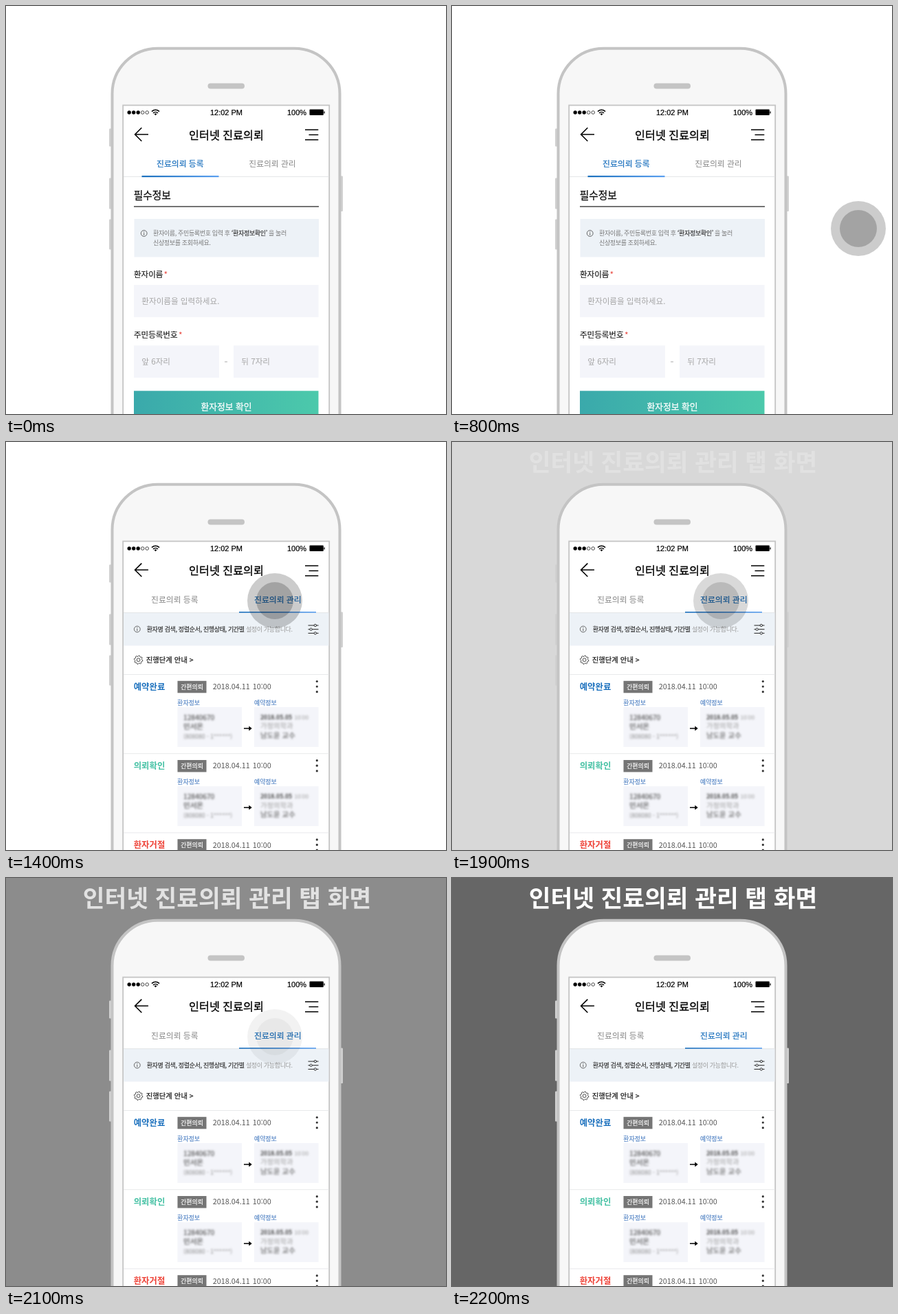
Animation, 640 px wide and 594 px high, one loop 3700 ms. Source, as an HTML page:

```html
<!DOCTYPE html>
<html lang="ko">
<head>
<meta charset="utf-8">
<style>
html, body { margin: 0; width: 100%; height: 100%; overflow: hidden; background: #fff; }
svg { display: block; width: 640px; height: 594px; font-family: "Noto Sans CJK KR", "Noto Sans CJK JP", sans-serif; }
.status { font-family: "Liberation Sans", sans-serif; }
</style>
</head>
<body>
<svg id="stage" viewBox="0 0 640 594"></svg>
<script>
const GREY = '#c4c4c4', FIELD = '#f4f5fa', NOTICE = '#edf2f7', BLUE = '#1b70bd';

// y is the visual middle of the line
function text(x, y, content, size, fill, attrs = '') {
  const baseline = (y + size * 0.38).toFixed(2);
  return `<text x="${x}" y="${baseline}" font-size="${size}" fill="${fill}" ${attrs}>${content}</text>`;
}
// a hairline outline turns the regular weight into a medium one
const medium = color => ` stroke="${color}" stroke-width=".02em"`;
const middle = 'text-anchor="middle"';
const tight = 'letter-spacing="-.35"';
const rect = (x, y, w, h, fill, attrs = '') =>
  `<rect x="${x}" y="${y}" width="${w}" height="${h}" fill="${fill}" ${attrs}/>`;
const dot = (x, y, r, fill, attrs = '') => `<circle cx="${x}" cy="${y}" r="${r}" fill="${fill}" ${attrs}/>`;
const line = (d, color, width = 1) => `<path d="${d}" fill="none" stroke="${color}" stroke-width="${width}"/>`;
const infoIcon = (x, y) =>
  dot(x, y, 4.4, 'none', 'stroke="#555" stroke-width=".9"') +
  line(`M${x} ${y - 2.6}v1.2m0 1v3`, '#555');

function phone() {
  const sideButtons = [[150, 178.5, 26], [150, 250.5, 45], [150, 310.5, 44], [486, 247.5, 51.5]]
    .map(([x, y, h]) => rect(x, y, 4, h, '#d0d0d0', 'rx="1"')).join('');
  return sideButtons +
    rect(154.5, 61.7, 331, 640, '#f7f7f7', `rx="66" stroke="${GREY}" stroke-width="4"`) +
    rect(293.5, 112.5, 53.5, 8, GREY, 'rx="4"') +
    rect(170.2, 144.5, 300, 500, '#fff', `stroke="${GREY}" stroke-width="1.8"`);
}

function statusBar() {
  const signal = [0, 1, 2, 3, 4].map(i => i < 3
    ? dot(179.2 + i * 6.5, 155, 2.7, '#000')
    : dot(179.2 + i * 6.5, 155, 2.3, '#fff', 'stroke="#000" stroke-width=".7"')).join('');
  const label = medium('#000') + ' class="status"';
  return signal +
    line('M212 153.6a7.8 7.8 0 0 1 11 0M214 155.9a5 5 0 0 1 7 0', '#000', 1.5) +
    '<path d="M217.5 159.2l-1.9-2a2.7 2.7 0 0 1 3.8 0z"/>' +
    text(320.5, 155, '12:02 PM', 11, '#000', middle + label) +
    text(409, 155, '100%', 11, '#000', label) +
    rect(441.5, 150.6, 20.3, 8.4, '#000', 'rx="1"') +
    rect(462.4, 153.3, 1.3, 3.2, '#000', 'rx=".6"');
}

function header(y) {
  return line(`M207 ${y}H188M197.3 ${y - 9.7}L187.6 ${y}l9.7 9.7`, '#000', 1.6) +
    text(320.5, y + .5, '인터넷 진료의뢰', 16.2, '#000', middle + medium('#000')) +
    line('M435 180.2h19.3M440.5 187.5h13.8M435 194.7h19.3', '#000', 1.5);
}

function tabs(leftX, rightX, registerActive) {
  const tab = (x, label, active) => active
    ? text(x, 229.7, label, 11.8, BLUE, middle + medium(BLUE))
    : text(x, 229.7, label, 11.8, '#888', middle);
  return tab(leftX, '진료의뢰 등록', registerActive) + tab(rightX, '진료의뢰 관리', !registerActive) +
    line('M171 248.5H469.5', '#e4e6e8') +
    rect(registerActive ? 197.5 : 339, 247, 112, registerActive ? 2.2 : 1.6, 'url(#underline)');
}

function registerScreen() {
  const label = (y, name, starX) =>
    text(186, y, name, 11.5, '#222', medium('#222')) + text(starX, y + .5, '*', 12, '#e8453c');
  const input = (x, y, w, hint) =>
    rect(x, y, w, 47, FIELD) + text(x + 11.3, y + 23.3, hint, 11.6, '#a6a6a6');
  return header(187) + tabs(253.3, 387.5, true) +
    text(185.8, 275.7, '필수정보', 14.7, '#111', medium('#111')) +
    line('M186 292H455', '#444', 1.4) +
    rect(186.5, 310, 268.5, 55.5, NOTICE) + infoIcon(200.7, 331) +
    text(214, 330.5, `환자이름, 주민등록번호 입력 후 <tspan fill="#333"${medium('#333')}>‘환자정보확인’</tspan> 을 눌러`, 9, '#777', tight) +
    text(214, 344.5, '신상정보를 조회하세요.', 9, '#777', tight) +
    label(390.7, '환자이름', 229.5) +
    input(186, 406, 268.5, '환자이름을 입력하세요.') +
    label(478.7, '주민등록번호', 251) +
    input(186, 494.3, 124, '앞 6자리') + line('M318 518h4', '#aaa') + input(331, 494.3, 123.5, '뒤 7자리') +
    rect(186, 560.3, 268.5, 50, 'url(#button)') +
    text(320.5, 583.2, '환자정보 확인', 12.8, '#fff', middle + medium('#fff'));
}

function bookingRow(y, status, color) {
  const blurred = `<g filter="url(#soften)">` +
    text(258, 44.7, '12840670', 10.2, '#555', medium('#555')) +
    text(258, 57.7, '민서온', 10.5, '#555', medium('#555')) +
    text(258, 73, '(808080 - 1******)', 8.6, '#888') +
    text(370, 44.5, '2018.05.05', 8.6, '#444', 'font-weight="700"') +
    text(419.5, 44.5, '10:00', 8.2, '#999') +
    text(370, 57.5, '가정의학과', 10.3, '#999') +
    text(370, 70.7, '남도윤 교수', 10.4, '#666', medium('#666')) + '</g>';
  return `<g transform="translate(0 ${y})">` +
    line('M171 -17.5H469.5', '#e8e9eb') +
    text(185.7, .3, status, 12.4, color, 'font-weight="700"') +
    rect(249.5, -8.2, 42, 17.5, '#757575') +
    text(270.5, .3, '간편의뢰', 8.9, '#fff', middle + medium('#fff')) +
    text(300.7, 0, '2018.04.11', 10.8, '#555') + text(358.7, 0, '10:00', 10.8, '#555') +
    [-7.5, 0, 7.7].map(dy => dot(452.3, dy, 1.6, '#333')).join('') +
    text(249.3, 23.5, '환자정보', 8.9, '#5585c5', medium('#5585c5')) +
    text(361, 23.5, '예약정보', 8.9, '#5585c5', medium('#5585c5')) +
    rect(249.5, 30, 93.5, 58, FIELD) + rect(361, 30, 93.5, 58, FIELD) +
    line('M346 61H356', '#000', 1.5) + '<path d="M353.3 57.6l4.4 3.4l-4.4 3.4z"/>' +
    blurred + '</g>';
}

function gear(x, y) {
  const points = Array.from({ length: 32 }, (_, i) => {
    const angle = i * Math.PI / 16 + Math.PI / 32, r = i % 4 < 2 ? 6.3 : 5;
    return `${(x + r * Math.cos(angle)).toFixed(1)},${(y + r * Math.sin(angle)).toFixed(1)}`;
  }).join(' ');
  const pen = 'fill="none" stroke="#333" stroke-width=".9" stroke-linejoin="round"';
  return `<polygon points="${points}" ${pen}/><circle cx="${x}" cy="${y}" r="2.4" ${pen}/>`;
}

function manageScreen() {
  const sliders = [[449.8, 267], [443.6, 272.7], [449.8, 278.4]].map(([x, y]) =>
    line(`M439.5 ${y}h15`, '#333', 1.1) + dot(x, y, 1.7, NOTICE, 'stroke="#333"')).join('');
  return header(186.3) +
    rect(171, 248.5, 298.5, 48, NOTICE) + tabs(245.3, 395.3, false) +
    infoIcon(190.8, 272.5) + sliders +
    text(204.7, 272.5, `<tspan fill="#333"${medium('#333')}>환자명 검색, 정렬순서, 진행상태, 기간별</tspan> 설정이 가능합니다.`, 9, '#999', tight) +
    gear(192.6, 317.2) +
    text(203.7, 317.2, '진행단계 안내 &gt;', 10.4, '#111', medium('#111')) +
    bookingRow(356, '예약완료', BLUE) +
    bookingRow(471.2, '의뢰확인', '#45c1a4') +
    bookingRow(586.4, '환자거절', '#ee4338');
}

const gradient = (id, from, to) =>
  `<linearGradient id="${id}"><stop stop-color="${from}"/><stop offset="1" stop-color="${to}"/></linearGradient>`;

document.getElementById('stage').innerHTML =
  `<defs>${gradient('underline', '#1b70bd', '#5a9ff0')}${gradient('button', '#3aa9ab', '#4cc9ab')}
  <filter id="soften"><feGaussianBlur stdDeviation="1.4"/></filter></defs>` +
  `<g id="backdrop">${rect(0, 0, 640, 594, '#000', 'opacity=".6"')}</g>` +
  `<g id="caption">${text(321.5, 29, '인터넷 진료의뢰 관리 탭 화면', 34.5, '#fff', middle + ' font-weight="700"')}</g>` +
  phone() + statusBar() +
  `<g id="register">${registerScreen()}</g><g id="manage">${manageScreen()}</g>` +
  `<g id="touch">${dot(0, 0, 40, '#000', 'opacity=".2"')}${dot(0, 0, 27, '#000', 'opacity=".2"')}</g>`;

const [backdrop, caption, register, manage, touch] =
  ['backdrop', 'caption', 'register', 'manage', 'touch'].map(id => document.getElementById(id));
const clamp = v => Math.min(1, Math.max(0, v));
const LOOP = 3700, STEP = 100;

function render(ms) {
  const t = Math.floor(ms / STEP) * STEP;
  const travel = clamp((t - 800) / 200);
  const fade = clamp((t - 1800) / 400);
  const pressed = t >= 1200 && t < 1400;
  backdrop.setAttribute('opacity', fade);
  caption.setAttribute('opacity', fade);
  register.setAttribute('display', t < 1400 ? 'inline' : 'none');
  manage.setAttribute('display', t < 1400 ? 'none' : 'inline');
  touch.setAttribute('transform', `translate(${591 - 200 * travel} ${324 - 93 * travel})`);
  touch.setAttribute('opacity', t < 800 ? 0 : pressed ? .5 : 1 - fade);
}

const start = performance.now();
function tick() {
  render((performance.now() - start) % LOOP);
  requestAnimationFrame(tick);
}
tick();
</script>
</body>
</html>
```
